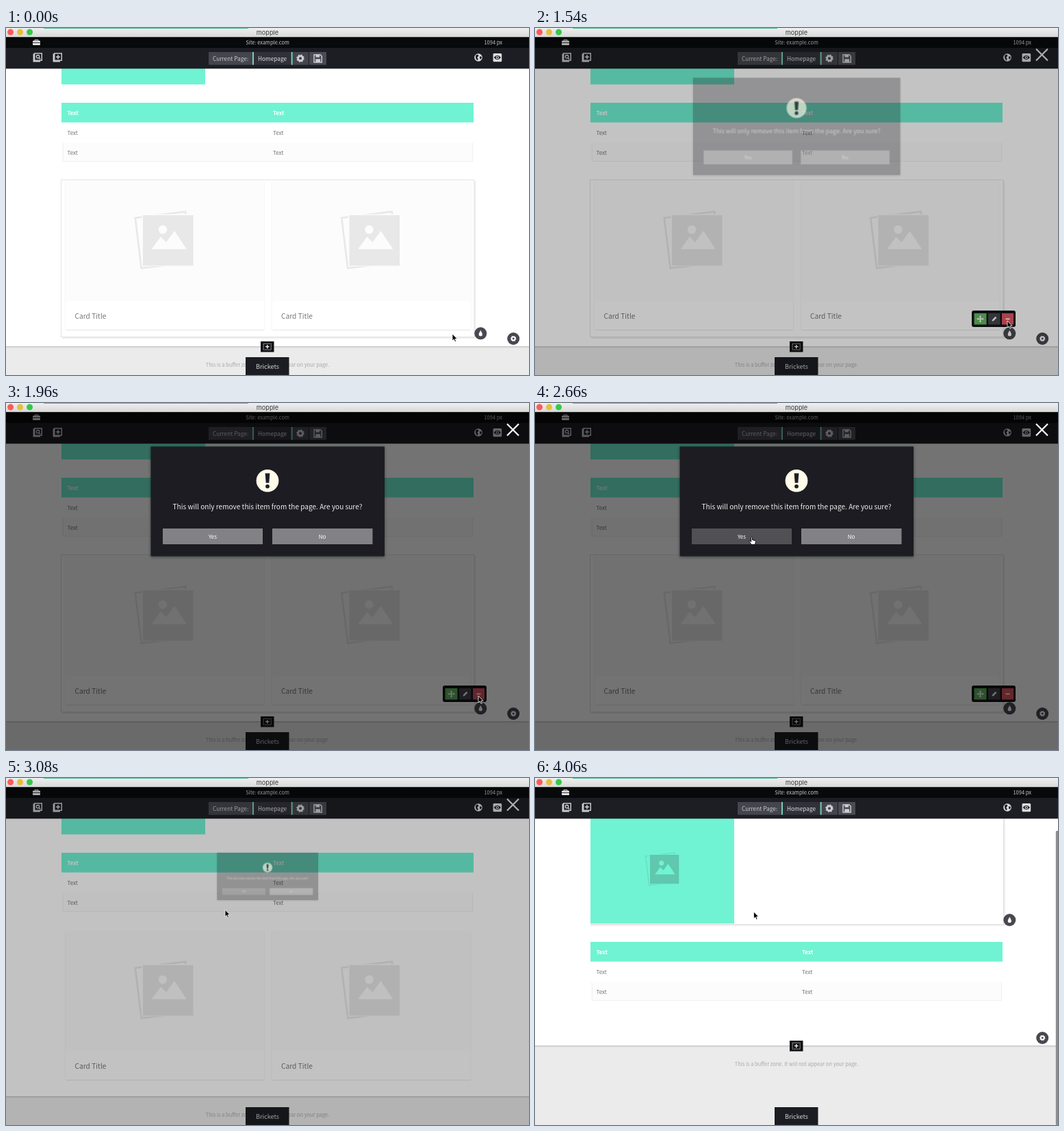
An HTML page that plays this animation: 764 by 506 pixels, repeating every 4130 ms.

```html
<!DOCTYPE html>
<html lang="en">
<head>
<meta charset="utf-8">
<title>Page builder</title>
<style>
html, body { margin: 0; width: 100%; height: 100%; overflow: hidden; background: #fff; }
svg { display: block; width: 764px; height: 506px; }
text { font-family: "Noto Sans CJK SC", "Noto Sans CJK JP", "Noto Sans CJK", "Open Sans", sans-serif; }
.title { font-family: Inter, "Liberation Sans", sans-serif; }
</style>
</head>
<body>
<svg id="stage" viewBox="0 0 764 506" xmlns="http://www.w3.org/2000/svg"></svg>
<script>
const LOOP = 4130, STEP = 70;
const MINT = '#70f3d3', BAR = '#1d1e23', PANEL = '#44454d', ICON = '#cfd0d3';

const rect = (x, y, w, h, fill, more = '') =>
  `<rect x="${x}" y="${y}" width="${w}" height="${h}" fill="${fill}" ${more}/>`;
const circle = (x, y, r, fill, more = '') =>
  `<circle cx="${x}" cy="${y}" r="${r}" fill="${fill}" ${more}/>`;
const path = (d, fill, more = '') => `<path d="${d}" fill="${fill}" ${more}/>`;
const line = (d, color, width = 1, more = '') =>
  path(d, 'none', `stroke="${color}" stroke-width="${width}" ${more}`);
const text = (x, y, size, str, fill, more = '') =>
  `<text x="${x}" y="${y}" font-size="${size}" fill="${fill}" ${more}>${str}</text>`;
const group = (id, body, more = '') => `<g id="${id}" ${more}>${body}</g>`;
const at = (x, y, body, scale = 1) =>
  `<g transform="translate(${x} ${y}) scale(${scale})">${body}</g>`;
const mid = 'text-anchor="middle"';

const gear = (x, y, r, fill) => at(x, y,
  circle(0, 0, r * .62, 'none', `stroke="${fill}" stroke-width="${r * .5}"`) +
  circle(0, 0, r * .88, 'none',
    `stroke="${fill}" stroke-width="${r * .3}" stroke-dasharray="${r * .3456}"`));

const dropButton = y => at(693.3, y, circle(0, 0, 9, '#484950') +
  path('M0-4.6C1.2-2 2.6-.3 2.6 1.4A2.6 2.6 0 0 1-2.6 1.4C-2.6-.3-1.2-2 0-4.6Z', '#fff'));

// Placeholder picture: a 73px square in front of a tilted frame
const picture = (ink, paper, frameAlpha = 1) =>
  `<rect x="-7" y="-1" width="74" height="74" fill="none" stroke="${ink}" stroke-width="2.6"
    opacity="${frameAlpha}" transform="rotate(-7 30 36)"/>` +
  rect(-1.5, -1.5, 76, 76, paper) + rect(0, 0, 73.5, 73.5, ink) +
  circle(29, 21, 6.2, paper) +
  path('M13.5 49L26 32 34 40 46 23.5 63 49Z', paper,
    `stroke="${paper}" stroke-linejoin="round"`);

const card = x => at(x, 0,
  rect(0, 223, 292, 175, '#fcfcfc') +
  line('M.5 225V440M291.5 225V440', '#f6f6f6') +
  line('M2 440.5H291', '#e6e6e6') +
  at(114, 273, picture('#e8e8e8', '#fcfcfc')) +
  text(14.5, 423.5, 10.2, 'Card Title', '#777'));

const row = (y, fill, more = '') =>
  text(89.5, y, 8, 'Text', fill, more) + text(390, y, 8, 'Text', fill, more);

const menu = rect(638, 412, 64, 24, '#111215', 'rx="3"') +
  rect(641.5, 416, 18, 16.5, '#63b862') +
  rect(662, 416, 17.5, 16.5, '#44454d') +
  rect(682, 416, 17, 16.5, '#e15561') +
  line('M646.5 424.3H654.5M650.5 420.3V428.3', '#fff', 1.5) +
  path('M650.5 419L652.3 421.3H648.7ZM650.5 429.6L648.7 427.3H652.3ZM645.2 424.3L647.5 422.5V426.1ZM655.8 424.3L653.5 426.1V422.5Z', '#fff') +
  path('M667.5 427.8L668.2 425.3 672.6 420.8 674.4 422.6 670 427.1Z', '#fff') +
  line('M687.5 424.3H693.5', '#fff', 1.8);

const page =
  rect(81, -100, 210, 182.3, MINT) +
  at(168, -18, picture('#5fc8ae', MINT, .45), .575) +
  group('blockUi',
    line('M684.5-100V83.5H81', '#dfdfdf', 1) +
    line('M686-100V85H81', '#f0f0f0', 2) + dropButton(77)) +
  rect(81, 109, 602, 28.7, MINT) +
  rect(81, 167, 602, 28, '#fcfcfc') +
  line('M83.5 168V194.5H681.5V168', '#f1f1f1') +
  row(126.7, '#fff', 'font-weight="700"') + row(155.8, '#777') + row(184.6, '#777') +
  group('cards',
    group('cardEdge', rect(82, 223, 604, 230, '#eee') + rect(80.5, 221.5, 603.5, 229, '#fff', 'stroke="#e3e3e3"')) +
    card(86) + card(387.5));

const buffer =
  rect(0, 464, 764, 200, '#ebebeb') +
  rect(0, 464, 764, 3, 'url(#edge)') +
  text(382, 494.3, 7.5, 'This is a buffer zone. It will not appear on your page.', '#aaa', mid) +
  group('bufferUi',
    rect(372, 457, 19.5, 15.5, '#111215') +
    rect(376.2, 460.2, 11, 9, 'none', 'stroke="#ddd" stroke-width=".9" stroke-dasharray="1.6 .9"') +
    line('M379 464.7H384.5M381.75 462V467.4', '#fff', 1.3) +
    circle(741.2, 453, 9, '#484950') + gear(741.2, 453, 4, '#fff'));

const stack = x => at(x, 43,
  line('M-5.7-5.5V5.7H4', ICON, 1.4) +
  rect(-4.3, -6, 10.6, 10.2, 'none', `stroke="${ICON}" stroke-width="1.4"`));

const header =
  rect(0, 13, 764, 16, '#08090b') + rect(0, 29, 764, 30.3, BAR) +
  rect(39, 18.6, 11, 6.4, '#e4e4e4', 'rx="1"') +
  line('M42 18.8V17.3H47V18.8', '#e4e4e4', 1) + line('M39 21.5H50', '#08090b', .8) +
  text(382, 23.6, 7.45, 'Site: example.com', '#c8c8ca', mid) +
  text(725, 23.6, 7.5, '1094 px', '#c8c8ca', 'text-anchor="end"') +
  stack(46) + circle(46.6, 41.7, 2.2, 'none', `stroke="${ICON}" stroke-width="1.3"`) +
  line('M48.2 43.4L50.3 45.5', ICON, 1.4) +
  stack(75) + line('M73 42.2H79M76 39.2V45.2', ICON, 1.6) +
  rect(296, 35, 64, 18.7, PANEL) + rect(360, 35, 2.2, 18.7, '#79cdb7') +
  rect(362.2, 35, 54.4, 18.7, '#303139') + rect(416.6, 35, 2.2, 18.7, '#79cdb7') +
  rect(418.8, 35, 23.2, 18.7, PANEL) + rect(443, 35, 25, 18.7, '#4a4b54') +
  text(302, 47.5, 8.3, 'Current Page:', '#c9c9cd') +
  text(368, 47.5, 8.3, 'Homepage', '#dcdce0') +
  gear(430, 44.3, 5.6, ICON) +
  path('M450 39H459L461.3 41.3V50H450Z', 'none', `stroke="${ICON}" stroke-width="1.4"`) +
  rect(452.5, 39, 5.6, 3.6, ICON) + rect(452.3, 45.3, 6.8, 4.5, ICON) +
  circle(690, 43, 5.8, '#dcdcde') +
  path('M686 40L689 38.6 690.5 40.6 688.3 43 689.8 45.2 688.4 47.5 686.3 44.2ZM692 41.3L695 42 694 45.6 692.2 45Z', BAR) +
  rect(711.5, 37, 12.7, 12.2, '#dcdcde', 'rx="1.5"') +
  path('M712.6 43.1Q717.8 36.8 723 43.1Q717.8 49.4 712.6 43.1Z', BAR) +
  circle(717.8, 43.1, 2.2, '#dcdcde') + circle(717.8, 43.1, 1.1, BAR);

const titleBar =
  rect(0, 0, 764, 13.2, 'url(#chrome)') + rect(55, 0, 299, 1, '#56b59d') +
  ['#fc5b57', '#e6bf3d', '#36c84b'].map((c, i) => circle(6.6 + i * 14, 6, 4.5, c)).join('') +
  text(382, 9.8, 9.2, 'mopple', '#3c3c3c', mid + ' class="title"');

const dialog =
  group('panel', rect(211.5, 63.5, 341.5, 160, '#1d1f24', 'filter="url(#soft)"')) +
  group('content',
    circle(382, 113.3, 16.4, '#fffbe8') +
    path('M378.6 102.5H385.4L384.3 116.5H379.7Z', '#1d1f24') + circle(382, 121.6, 2.9, '#1d1f24') +
    text(382, 154.8, 10.07, 'This will only remove this item from the page. Are you sure?', '#eee', mid) +
    rect(229, 183, 146, 23, '#fff', 'id="yes"') +
    rect(389, 183, 146.5, 23, '#fff', 'opacity=".45"') +
    text(302, 197.7, 8, 'Yes', '#fff', mid) + text(462, 197.7, 8, 'No', '#fff', mid));

const arrow = path('M0 0V10L2.3 7.9 3.9 11.4 5.5 10.7 4 7.3H7.1Z', '#000',
  'stroke="#fff" stroke-width=".8"');
const hand = path('M-1 1C-1-.4 .9-.4 .9 1V4.2L4.6 5.2C5.8 5.6 6 6.2 5.8 7.2L5 11H-.6L-3.6 6.8C-4 5.8-2.8 5.2-2 6L-1 7Z',
  '#fff', 'stroke="#000" stroke-width="1"');

document.getElementById('stage').innerHTML =
  `<defs>
    <linearGradient id="chrome" x2="0" y2="1"><stop stop-color="#efefef"/><stop offset="1" stop-color="#d8d8d8"/></linearGradient>
    <linearGradient id="edge" x2="0" y2="1"><stop stop-color="#c4c4c4"/><stop offset="1" stop-color="#ebebeb"/></linearGradient>
    <filter id="soft"><feDropShadow dx="0" dy="1" stdDeviation="2" flood-opacity=".45"/></filter>
  </defs>` +
  rect(0, 0, 764, 506, '#fff') +
  group('page', page) + group('buffer', buffer) +
  group('cardUi', dropButton(445.3) + group('menu', menu)) +
  rect(760.8, 77, 4, 429, '#8d8d8d', 'id="scroll" rx="1.5"') +
  header +
  rect(350, 480, 63.5, 26, '#1b1d22') + text(382, 497.2, 9.1, 'Brickets', '#d2d2d4', mid) +
  rect(0, 13, 764, 493, '#000', 'id="shade"') +
  group('dialog', dialog) +
  group('close', line('M732 30.5L749 47.5M749 30.5L732 47.5', '#fff', 2.2)) +
  titleBar +
  group('cursor', group('arrow', arrow) + group('hand', hand));

const $ = {};
document.querySelectorAll('#stage [id]').forEach(el => $[el.id] = el);
const alpha = (el, v) => el.setAttribute('opacity', v);
const show = (el, on) => el.setAttribute('display', on ? 'inline' : 'none');
const move = (el, v) => el.setAttribute('transform', v);
const ramp = (t, from, to) => Math.min(1, Math.max(0, (t - from) / (to - from)));

const OPEN = 1400, CLICK = 2870, REMOVED = 3220;
// time, x, y
const trail = [
  [0, 652, 446], [140, 652, 446], [490, 691, 446], [770, 695, 445], [1050, 690.5, 429.5],
  [1330, 690.5, 429.5], [1470, 690, 427], [1960, 690, 427], [2240, 400, 226],
  [2590, 316, 196], [2870, 320, 192], [3010, 320, 192], [3290, 320, 194], [4060, 319.5, 195]
];
function cursorAt(t) {
  const i = trail.findIndex(k => k[0] > t);
  if (i < 0) return trail[trail.length - 1].slice(1);
  const [a, b] = [trail[i - 1], trail[i]];
  const p = ramp(t, a[0], b[0]), e = p * p * (3 - 2 * p);
  return [a[1] + (b[1] - a[1]) * e, a[2] + (b[2] - a[2]) * e];
}

function draw(t) {
  const removed = t >= REMOVED, closing = t >= CLICK;
  const p = closing ? 1 - ramp(t, CLICK, 3240) : ramp(t, OPEN, 1725);
  const fade = ramp(t, REMOVED, 3570);

  move($.page, `translate(0 ${removed ? 130 : 0})`);
  move($.buffer, `translate(0 ${removed ? -74 : 0})`);
  show($.cards, !removed);
  show($.scroll, removed);
  show($.cardEdge, !closing);
  show($.cardUi, !closing);
  alpha($.blockUi, fade);
  alpha($.bufferUi, closing ? fade : 1);
  alpha($.menu, ramp(t, 490, 700));

  const open = p > 0 && !removed;
  [$.shade, $.dialog, $.close].forEach(el => show(el, open));
  const scale = closing ? p : .8 + .2 * p;
  move($.dialog, `translate(382 143.5) scale(${scale}) translate(-382 -143.5)`);
  alpha($.shade, .55 * p);
  alpha($.panel, p ** 1.5);
  alpha($.content, Math.sqrt(p));
  alpha($.close, Math.sqrt(p));
  const onYes = t >= 2380;
  alpha($.yes, onYes ? .23 : .45);

  move($.cursor, `translate(${cursorAt(t).join(' ')})`);
  const pointing = (t >= 420 && t < OPEN) || (onYes && !closing);
  show($.hand, pointing);
  show($.arrow, !pointing);
}

const start = performance.now();
function tick() {
  const t = (performance.now() - start) % LOOP;
  draw(Math.floor(t / STEP) * STEP);
  requestAnimationFrame(tick);
}
draw(0);
requestAnimationFrame(tick);
</script>
</body>
</html>
```
